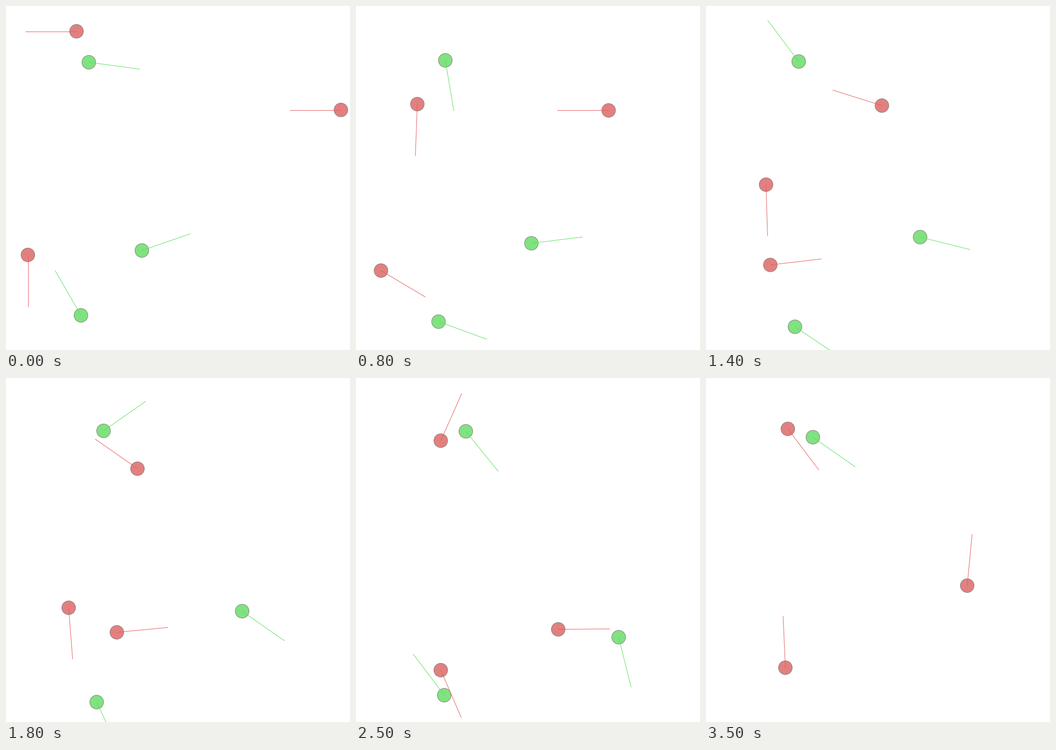
Recreate the animation shown at these times as a matplotlib script. Size 700x700 px, loop 3600 ms.

```python
import matplotlib.pyplot as plt
import numpy as np
from matplotlib.animation import FuncAnimation
from matplotlib.patches import Circle

SIZE, DPI = 700, 100
FRAMES, STEP_MS = 36, 100
RADIUS, REACH = 14, 105
PX = 72 / DPI
BEATS = np.array([0, 5, 10, 18, 25, 30, 35])  # steps at which every agent strikes a pose

# fill, line
RED = ("#e28080", "#e35c5c")
GREEN = ("#80e280", "#5cdf5c")
EDGE = "#86807c"

fig = plt.figure(figsize=(SIZE / DPI, SIZE / DPI), dpi=DPI, facecolor="white")
ax = fig.add_axes([0, 0, 1, 1])
ax.set_xlim(0, SIZE)
ax.set_ylim(SIZE, 0)
ax.axis("off")


def spline(t, times, points, slopes):
    """Cubic Hermite curve through timed points, at rest after the last one."""
    t = min(t, times[-1])
    i = min(np.searchsorted(times, t, side="right"), len(times) - 1) - 1
    h = times[i + 1] - times[i]
    u = (t - times[i]) / h
    ease = u * u * (3 - 2 * u)
    bend = u * (1 - u) * h * ((1 - u) * slopes[i] - u * slopes[i + 1])
    return points[i] + ease * (points[i + 1] - points[i]) + bend


class Agent:
    """A disc with a heading ray that glides through poses (x, y, degrees)."""

    def __init__(self, colors, *poses, last=FRAMES):
        fill, line = colors
        poses = np.array(poses, float)
        self.times = BEATS[:len(poses)]
        self.points, self.turns = poses[:, :2] + 0.5, poses[:, 2]
        self.slopes = np.gradient(self.points, self.times, axis=0)
        self.last = last
        self.disc = ax.add_patch(Circle((0, 0), RADIUS, fc=fill, ec=EDGE, lw=PX, zorder=2))
        self.ray, = ax.plot([], [], color=line, lw=PX, zorder=3,
                            solid_capstyle="butt")

    def move(self, step):
        alive = step <= self.last
        self.disc.set_visible(alive)
        self.ray.set_visible(alive)
        x, y = spline(step, self.times, self.points, self.slopes)
        a = np.radians(np.interp(step, self.times, self.turns))
        self.disc.center = x, y
        self.ray.set_data([x, x + REACH * np.cos(a)], [y, y + REACH * np.sin(a)])
        return self.disc, self.ray


agents = [
    # prey
    Agent(GREEN, (168, 114, 7.7), (180, 103, -10.4), (182, 115, 141), (198, 107, 325),
          (223, 108, 411), (209, 121, 502), (217, 120, 395)),
    Agent(GREEN, (276, 497, -19), (317, 491, -7), (384, 477, -7), (480, 474, 35),
          (534, 527, 76), last=28),
    Agent(GREEN, (152, 629, -120), (159, 640, 46), (173, 643, 2.7), (184, 659, 65),
          (179, 645, 233), last=26),
    # hunters
    Agent(RED, (143, 51, 180), (127, 127, 94), (124, 252, 91), (127, 467, 85.6),
          (172, 594, 66.6), (163, 613, -105.5), (161, 589, -92.5)),
    Agent(RED, (681, 211, 180), (589, 211, 180), (461, 211, 180), (267, 184, 215),
          (172, 127, 294), (175, 99, 299), (166, 103, 53)),
    Agent(RED, (44, 506, 90), (45, 537, 89), (63, 535, -8), (225, 517, -5.4),
          (411, 511, -0.5), (509, 512, -32.5), (531, 422, -84.5)),
]


def draw(step):
    return [artist for agent in agents for artist in agent.move(step)]


anim = FuncAnimation(fig, draw, frames=FRAMES, interval=STEP_MS, repeat=True,
                     repeat_delay=0, blit=False)
plt.show()
```
